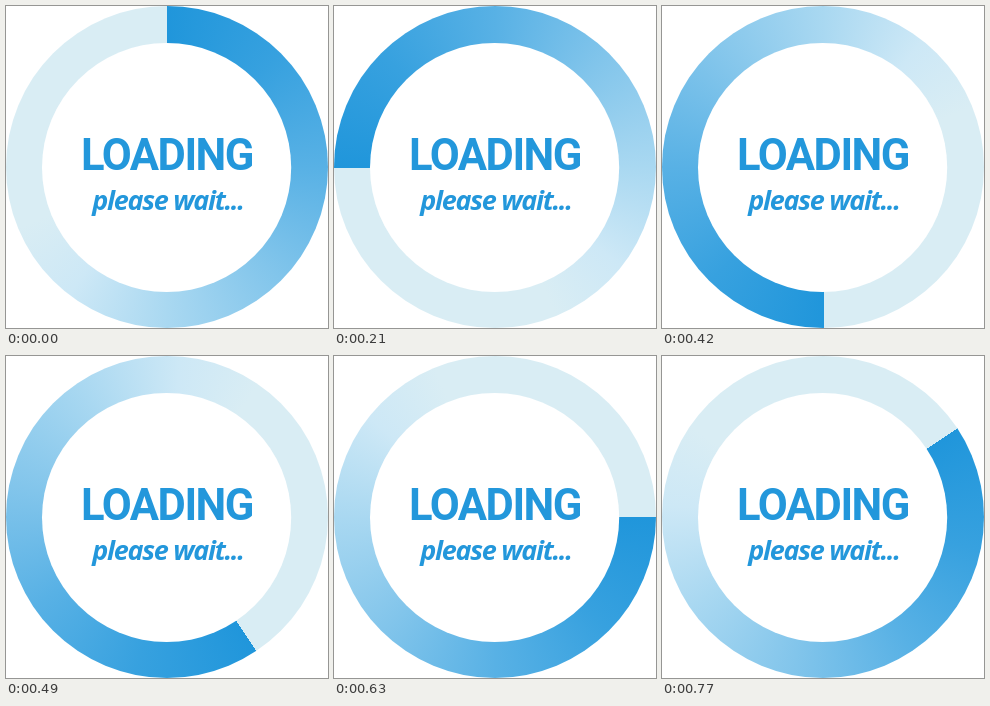
Animation of 322x322 px, one loop 840 ms. Source, as an HTML page:

```html
<!DOCTYPE html>
<html lang="en">
<head>
<meta charset="utf-8">
<title>Loading</title>
<style>
  html, body { margin: 0; width: 100%; height: 100%; overflow: hidden; background: #fff; }
  #stage { position: relative; width: 322px; height: 322px; }
  #ring { position: absolute; inset: 0; border-radius: 50%; }
  svg { position: absolute; inset: 0; display: block; }
  text { fill: #2397db; text-anchor: middle; }
  .title { font: 700 43.5px Roboto, "Open Sans", sans-serif; letter-spacing: -1.5px; }
  .note { font: italic 650 27px "Open Sans", "Noto Sans", sans-serif; letter-spacing: -1.3px; }
</style>
</head>
<body>
<div id="stage">
  <div id="ring"></div>
  <svg width="322" height="322" viewBox="0 0 322 322">
    <circle cx="160.6" cy="161.5" r="124.6" fill="#fff"/>
    <text class="title" x="161" y="164">LOADING</text>
    <text class="note" x="162" y="203.5">please wait...</text>
  </svg>
</div>
<script>
  const STEP = 70;
  // Head of the sweep, degrees counterclockwise from the top; the last two swap places.
  const HEADS = [0, 33.6, 56.4, 90, 123.6, 146.4, 180, 213.6, 236.4, 270, 326.4, 303.6];
  const FADE = [
    "#2096db 0deg", "#37a1df 45deg", "#58b1e5 90deg", "#82c5eb 135deg",
    "#a9d8f1 180deg", "#cde8f6 218deg", "#d9edf4 248deg", "#d9edf4 360deg"
  ].join(", ");
  const ring = document.getElementById("ring");

  function draw(ms) {
    const head = HEADS[Math.floor(ms / STEP) % HEADS.length];
    ring.style.background = `conic-gradient(from ${-head}deg at 161.5px 161.5px, ${FADE})`;
  }

  const start = performance.now();
  function tick() {
    draw(performance.now() - start);
    requestAnimationFrame(tick);
  }
  draw(0);
  requestAnimationFrame(tick);
</script>
</body>
</html>
```
